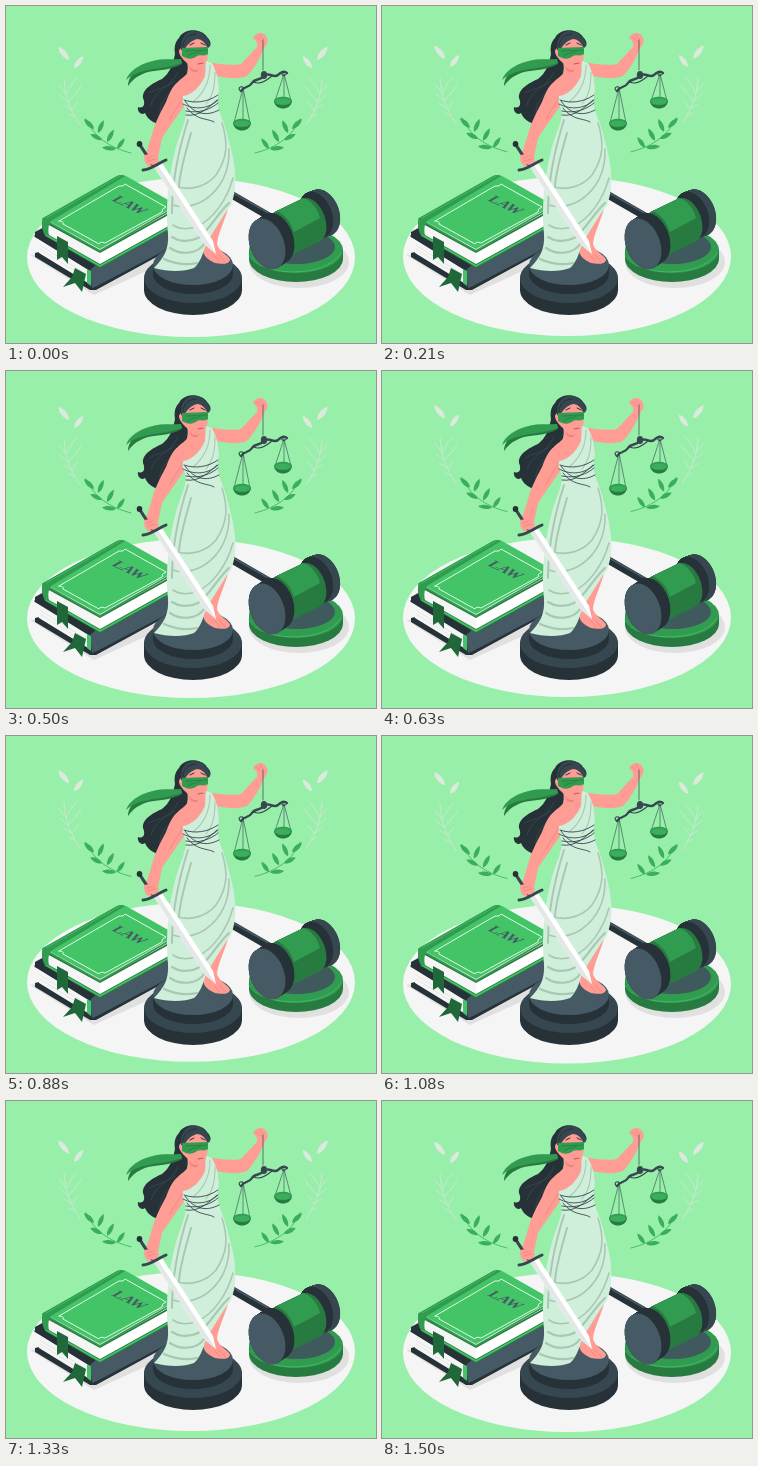
An HTML page with a canvas for the animation above (1540 ms loop, 370 by 337 pixels).

```html
<!DOCTYPE html>
<html lang="en">
<head>
<meta charset="utf-8">
<title>Lady Justice</title>
<style>
html, body { margin: 0; width: 100%; height: 100%; overflow: hidden; background: #97efaa; }
canvas { display: block; width: 100vw; height: 100vh; }
</style>
</head>
<body>
<canvas id="stage"></canvas>
<script>
const W = 370, H = 337, LOOP = 1540;
const FLOOR_LIFT = 5.5, LAUREL_LIFT = 7;
const canvas = document.getElementById('stage');
const dpr = window.devicePixelRatio || 1;

const INK = '#263238', SLATE = '#37474f', STEEL = '#455a64';
const GREEN = '#43c466', MID = '#319b50', DEEP = '#287b40', DARK = '#20683a';
const SKIN = '#ff9c94', SKIN_SHADE = '#ed847e', CLOTH = '#d0efda', FOLD = '#a9c8b3';
const PALE = '#dce9dc', LEAF = '#3aae5d', FLOOR = '#f5f5f5', SHADOW = '#e0e0e0';

function setup(c) {
  c.width = Math.round(W * dpr);
  c.height = Math.round(H * dpr);
  const g = c.getContext('2d');
  g.scale(c.width / W, c.height / H);
  g.lineCap = g.lineJoin = 'round';
  return g;
}

const view = setup(canvas);
const still = document.createElement('canvas');
let ctx = setup(still);

function fill(color, d) {
  ctx.fillStyle = color;
  ctx.fill(new Path2D(d));
}

function line(color, width, d) {
  ctx.strokeStyle = color;
  ctx.lineWidth = width;
  ctx.stroke(new Path2D(d));
}

function oval(color, x, y, rx, ry, turn = 0) {
  ctx.fillStyle = color;
  ctx.beginPath();
  ctx.ellipse(x, y, rx, ry, turn, 0, Math.PI * 2);
  ctx.fill();
}

function disk(top, side, x, y, rx, ry, h) {
  oval(side, x, y + h, rx, ry);
  ctx.fillRect(x - rx, y, rx * 2, h);
  oval(top, x, y, rx, ry);
}

// Cylinder lying between two tilted end ellipses
function barrel(color, x1, y1, x2, y2, rx, ry, turn) {
  const steps = 40;
  for (let i = 0; i <= steps; i++) {
    const k = i / steps;
    oval(color, x1 + (x2 - x1) * k, y1 + (y2 - y1) * k, rx, ry, turn);
  }
}

function leaf(color, x, y, degrees, length, width) {
  ctx.save();
  ctx.translate(x, y);
  ctx.rotate(degrees * Math.PI / 180);
  fill(color, `M0 0C${length * .3} ${-width} ${length * .75} ${-width * .8} ${length} 0C${length * .7} ${width * .8} ${length * .3} ${width} 0 0Z`);
  ctx.restore();
}

function drawLaurel() {
  leaf(PALE, 63, 54, 231, 17, 4);
  leaf(PALE, 68, 62, -52, 15, 3.6);
  line('#cde7d1', .9, 'M58 73C59 91 64 104 74 119M60 88L53 79M62 96L54 89M66 104L58 99M60 88L66 78M62 96L71 86M66 104L72 96M69 111L63 108M66 78L71 72M71 86L75 80');
  line(LEAF, .8, 'M80 113C87 129 101 141 125 147');
  leaf(LEAF, 88, 123, 225, 14, 3.4);
  leaf(LEAF, 96, 134, 207, 13, 3.2);
  leaf(LEAF, 110, 143, 186, 14, 3.2);
  leaf(LEAF, 92, 127, -66, 14, 3.2);
  leaf(LEAF, 101, 136, -61, 14, 3.2);
  leaf(LEAF, 111, 143, -54, 13, 3);
}

function drawBooks() {
  fill(SHADOW, 'M24 249L88 289L176 249L150 230Z');

  // Lower book
  fill(INK, 'M29 226L38 221L91 257L167 222V242L90 284L84 284L29 251V247L33 246V233L29 231Z');
  fill(FLOOR, 'M33 233L82 263V277L33 247C31 242 31 237 33 233Z');
  line('#d8dedd', .6, 'M34 239L80 268M34 243L80 272');
  fill(STEEL, 'M84 264L91 258L167 222V240L91 280L86 282Z');
  line(INK, 1.5, 'M29 230L84 264M30 249L86 283');
  fill(GREEN, 'M81 263L85 265V280L81 277Z');
  fill(DARK, 'M69 262L80 268L76 286L69 277L57 281L66 271Z');

  // Upper book: pages between two thin covers
  fill(DEEP, 'M37 213L94 245L168 204V221L94 262L39 230C36 224 35 218 37 213Z');
  fill(FLOOR, 'M41 218L94 247V258L43 229C40 225 40 221 41 218Z');
  fill('#ffffff', 'M94 247L168 206V217L94 258Z');
  line(GREEN, 1.6, 'M40 229L94 260L168 219');
  line(MID, 1.8, 'M37 213L94 245L170 201');
  fill(GREEN, 'M37 212L111 170Q115 168 120 170L171 199L94 243Z');
  fill(MID, 'M37 212L111 170Q115 168 119 170L45 215C42 219 42 224 43 230L39 229C36 223 35 217 37 212Z');
  line(GREEN, .8, 'M40 212L114 170');
  line('#e2f8e8', 1, 'M53 215L113 180Q118 181 119 178L160 201Q155 203 156 206L99 237Q94 235 93 238L57 218Q58 215 53 215Z');
  fill(DARK, 'M51 230L62 236V258L56 251L51 254Z');

  ctx.save();
  ctx.transform(.9, .44, -.86, .5, 105, 194);
  ctx.fillStyle = STEEL;
  ctx.font = 'bold 14.5px "Liberation Serif", serif';
  ctx.fillText('LAW', 0, 0);
  ctx.restore();
}

function drawGavel() {
  oval(SHADOW, 293, 256, 50, 26);
  disk(MID, DEEP, 290, 244, 47, 23, 9);
  line(GREEN, .8, 'M243 249C252 270 319 274 335 247');
  oval('#3f5a5c', 291, 241, 38, 17);

  line(INK, 7.5, 'M221 186L266 212');
  line(STEEL, 1.6, 'M222 184L266 209');

  const tilt = -.36;
  barrel(SLATE, 310, 209, 317, 206.5, 16, 24, tilt);
  oval(INK, 310, 209, 16, 24, tilt);
  barrel(DEEP, 278, 227, 305, 214, 14, 23, tilt);
  fill(MID, 'M271 205L297 192C305 194 312 203 314 212L288 226C285 216 279 209 271 205Z');
  barrel(INK, 261, 238, 270, 232, 17, 26, tilt);
  oval(STEEL, 261, 238, 17, 26.5, tilt);
}

function drawPedestal() {
  disk(SLATE, INK, 187, 272, 49, 25, 12);
  disk(STEEL, INK, 187, 259, 40, 20, 9);
}

function drawScales() {
  line(SLATE, .7, 'M257 34V64');
  line(SLATE, 2.4, 'M235 85C238 80 243 82 246 77C249 72 254 75 258 70C263 65 267 73 272 69C275 66 278 64 281 67');
  line(SLATE, 1.1, 'M235 85C231 83 234 79 238 82M281 67C279 71 275 70 276 66M248 76C253 79 260 75 266 70');
  oval(SLATE, 258, 69, 3.2, 4);
  for (const [x, y, top] of [[236, 117, 82], [277, 95, 68]]) {
    line(SLATE, .6, `M${x + 1} ${top}L${x - 8} ${y}M${x + 1} ${top}L${x + 8} ${y}M${x + 1} ${top}L${x + 1} ${y + 3}`);
    fill(DEEP, `M${x - 9} ${y}C${x - 8} ${y + 10} ${x + 8} ${y + 10} ${x + 9} ${y}Z`);
    oval(MID, x, y, 9, 4.2);
    oval(LEAF, x, y + .5, 7.6, 3.1);
  }
}

function drawHead() {
  fill(INK, 'M173 32C178 22 195 22 201 31C205 35 206 39 202 42L183 52L180 78C180 90 170 96 166 106C163 112 166 117 160 119C151 119 142 115 139 107C135 110 131 105 132 101C137 103 140 99 137 92C136 83 147 77 156 73C164 67 167 58 169 48C168 41 169 36 173 32Z');
  line(SLATE, .9, 'M172 66C165 82 149 83 145 99M175 77C163 90 152 93 154 113M169 75C158 83 150 83 143 87');
  fill(DEEP, 'M175 54C160 57 145 59 133 64C126 67 122 73 122 80C129 70 139 66 148 65C159 64 168 62 176 58Z');
  fill(MID, 'M175 53C165 54 154 52 143 56C133 59 123 65 120 74C129 66 138 65 147 63C158 62 167 60 176 57Z');
}

function drawBody() {
  // Raised arm, shoulders, neck
  fill(SKIN, 'M201 56C213 58 225 60 235 58L251 41C252 38 251 35 247 32C249 28 255 25 259 29C263 33 262 38 258 42C254 53 248 62 242 69C237 73 224 73 211 70Z');
  line(SKIN_SHADE, .8, 'M250 31L255 35M254 29L258 34');
  fill(SKIN, 'M181 53L193 58L192 62L207 58L213 78L207 96L178 98L170 80C172 72 182 71 182 64Z');
  fill(SKIN_SHADE, 'M183 60C186 64 190 65 193 63L191 66C187 67 184 65 183 60Z');

  // Face, hairline and blindfold
  fill(SKIN, 'M178 37C184 31 196 30 200 37C203 43 202 51 200 58C197 64 190 65 185 60C180 57 174 51 173 46C173 42 176 41 178 44Z');
  fill(SLATE, 'M175 44C174 33 179 26 186 25C195 24 201 30 204 37C205 40 203 42 201 41C199 36 195 33 191 33C185 35 181 38 178 45Z');
  line(INK, 1, 'M177 40C177 33 183 28 190 28M184 39L188 37M195 37L199 39');
  fill(MID, 'M176 42C184 42 193 41 202 41L202 48C197 51 194 48 191 50C186 54 181 53 176 50Z');
  line(DEEP, .8, 'M180 45L201 44M182 50C186 46 190 48 195 45');
  line('#c9555c', 1.1, 'M192 58L197 57');

  // Lowered arm
  fill(SKIN, 'M176 74C167 77 164 86 160 96C153 109 148 119 145 132L139 150C137 156 141 161 146 161C151 160 154 156 152 151L156 132C163 121 173 108 180 97L184 80Z');
  line(SKIN_SHADE, .8, 'M177 91C174 97 168 106 164 113');
}

function drawDress() {
  fill(SKIN, 'M219 198L222 203C217 219 212 228 211 238C213 246 224 250 224 254C223 259 214 258 209 257C202 254 197 250 197 243L201 222Z');
  line(SKIN_SHADE, .8, 'M209 250L214 256M213 249L219 256');

  fill(CLOTH, 'M200 55L206 57C212 68 214 80 212 91C210 103 217 112 220 124C224 140 228 151 229 166C230 179 229 188 225 199C216 211 208 225 200 238C197 248 194 257 188 262C178 266 162 266 148 262C158 252 163 243 162 228C159 200 163 168 169 145C173 128 180 118 180 105C177 99 176 95 177 90C187 89 196 78 199 70Z');
  line(FOLD, 1.1, 'M204 59C204 76 197 88 187 96M209 66C209 83 206 91 200 98');
  line(FOLD, 2, 'M182 114C174 139 166 171 166 207M185 127C179 149 174 164 173 180');
  line(FOLD, 1.6, 'M216 117C222 136 222 151 210 169C201 180 185 185 172 181M223 143C224 166 214 183 200 193C188 201 175 202 167 199M227 172C221 194 207 213 192 220C182 224 173 223 167 219');
  line(FOLD, 2.2, 'M223 197C211 208 203 225 192 232C182 237 172 235 166 231M199 237C191 249 174 249 164 242M191 257C178 260 167 257 158 253');
  line(SLATE, .9, 'M178 94C189 98 202 96 212 89M177 98C190 105 204 102 212 94M180 105C193 108 205 103 212 97M179 95C188 108 200 111 213 104M180 109C193 111 202 102 211 94M181 102C191 115 202 112 208 116');
}

function drawSword() {
  fill('#ffffff', 'M148 161L156 157L207 235L210 248L199 239Z');
  fill('#e3e8e7', 'M148 161L152 159L210 248L199 239Z');
  line(SLATE, 3.2, 'M134 139L147 159');
  oval(INK, 133.5, 138, 2.8, 3);
  line(SLATE, 3, 'M137 164C144 164 151 158 160 154');
  fill(SKIN, 'M138 149L151 147C153 152 152 157 147 159L139 156Z');
  line(SKIN_SHADE, .8, 'M141 152L147 150M142 155L149 153');
}

function drawStill() {
  drawBooks();
  drawGavel();
  drawPedestal();
  drawHead();
  drawBody();
  drawDress();
  drawSword();
  drawScales();
}

function frame(now) {
  const rise = (1 - Math.cos(now / LOOP * Math.PI * 2)) / 2;
  ctx.fillStyle = '#97efaa';
  ctx.fillRect(0, 0, W, H);
  oval(FLOOR, 185, 251.5 - FLOOR_LIFT * rise, 164, 79.5);
  ctx.save();
  ctx.translate(0, -LAUREL_LIFT * rise);
  drawLaurel();
  ctx.translate(374, 0);
  ctx.scale(-1, 1);
  drawLaurel();
  ctx.restore();
  ctx.drawImage(still, 0, 0, W, H);
}

drawStill();
ctx = view;
const start = performance.now();
function tick() {
  frame(performance.now() - start);
  requestAnimationFrame(tick);
}
tick();
</script>
</body>
</html>
```
